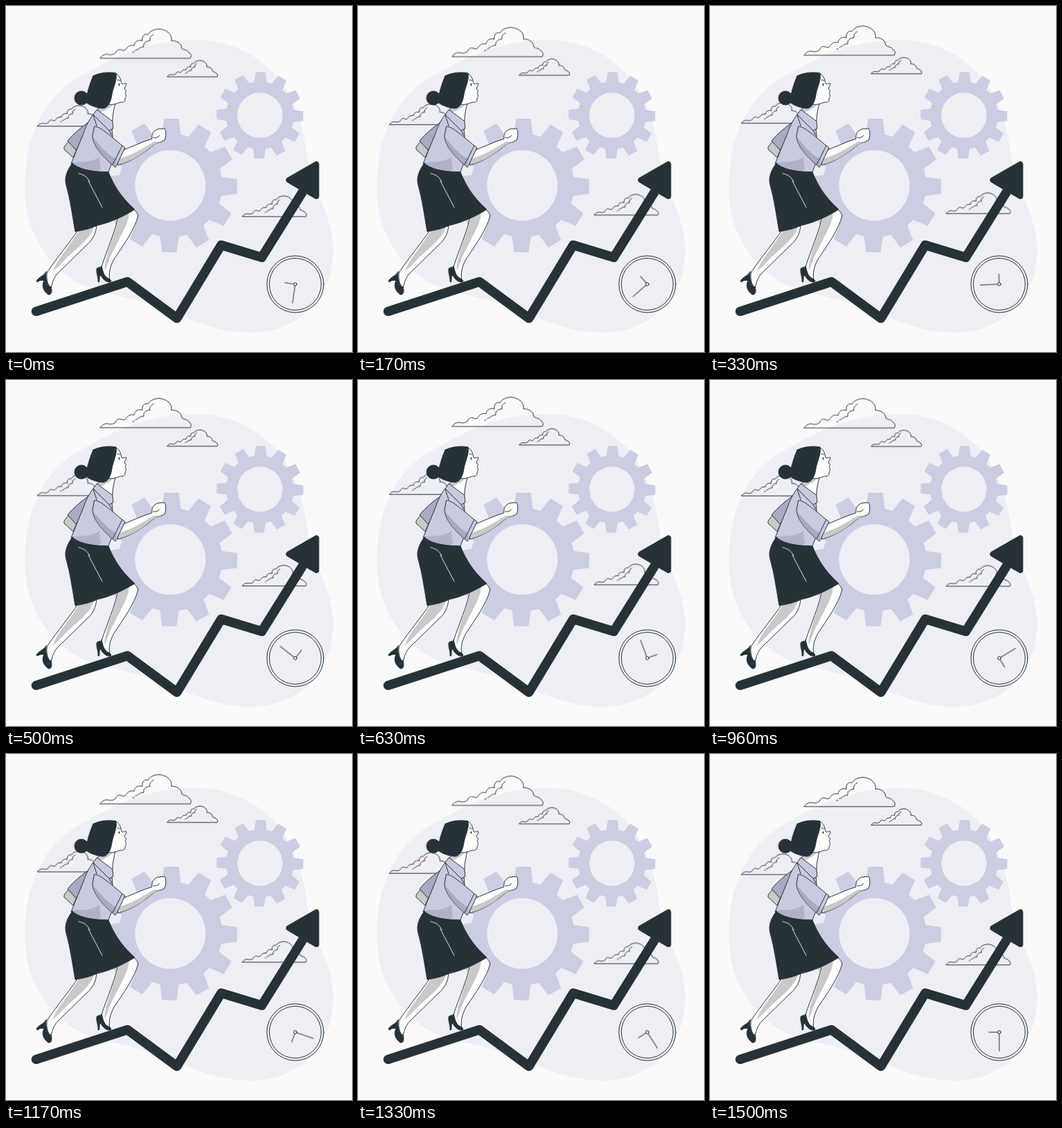
An HTML page for the animation above (1.54 s loop, 500 px wide and 500 px high).

```html
<!DOCTYPE html>
<html lang="en">
<head>
<meta charset="utf-8">
<title>Growth</title>
<style>
  html, body { margin: 0; width: 100%; height: 100%; overflow: hidden; background: #fafafa; }
  svg { display: block; width: 100vw; height: 100vh; }
  .ink { fill: #263238; }
  .soft { fill: #cbcde2; }
  .blob { fill: #eeeff5; }
  .line { fill: none; }
  .white { fill: #fff; }
  .shade { fill: #c9c9c9; stroke: none; }
  .shirt { fill: #c8cae0; }
  .fold { fill: #a8aac2; }
  .thin { stroke: #263238; stroke-width: 1; stroke-linecap: round; stroke-linejoin: round; }
  .cloud path { vector-effect: non-scaling-stroke; }
  .float { animation: float 1540ms linear infinite; }
  .hands { transform-origin: 418px 402px; animation: turn 1540ms linear infinite; }
  @keyframes float {
    0% { transform: translateY(-.45px); }
    46.5% { transform: translateY(-10px); }
    95.2%, 100% { transform: translateY(0); }
  }
  @keyframes turn {
    0% { transform: rotate(8deg); }
    95.2%, 100% { transform: rotate(360deg); }
  }
</style>
</head>
<body>
<svg viewBox="0 0 500 500">
  <defs>
    <g id="cloud" class="cloud thin line">
      <path d="M0 0C3-4 7-6 11-5.500C15-4 19-5 22-7C24-12 27-13 30-12C34-10 37-11 38-14C41-18 45-19 49-18C50-24 55-27 61-25C60-32 65-36 69-34C72-39 78-42 86-42C96-41 105-34 103-25C110-26 118-21 118-14C122-11 127-12 128-8C132-7 132-2 130.500 0Z"/>
      <path d="M77-34C73-32 71-29 72-25C66-25 62-21 63-16C58-17 55-12 51-11M49-9L47-8.500"/>
    </g>
  </defs>

  <path class="blob" d="M275 49C326 49 371 74 397 109C425 146 430 186 437 225C441 264 473 303 473 352C472 425 420 472 355 472C297 472 259 448 207 430C163 416 119 416 82 385C44 352 27 309 27 262C27 194 51 136 100 106C150 77 198 49 275 49Z"/>
  <path id="bigGear" class="soft" fill-rule="evenodd"/>
  <path id="smallGear" class="soft" fill-rule="evenodd"/>

  <g class="float">
    <use href="#cloud" transform="translate(136 75.700)"/>
    <use href="#cloud" transform="translate(233 102.500) scale(.555)"/>
    <use href="#cloud" transform="translate(45.500 173.900) scale(.705)"/>
    <use href="#cloud" transform="translate(341.500 304.500) scale(.705)"/>
  </g>

  <g class="thin line">
    <circle cx="418" cy="402" r="41"/>
    <circle cx="418" cy="402" r="37.500"/>
    <path class="hands" d="M418 404.500V429.500M415.500 402H403"/>
    <circle cx="418" cy="402" r="2.300"/>
  </g>

  <g stroke="#263238" stroke-linejoin="round" stroke-linecap="round">
    <path class="line" stroke-width="13.500" d="M43.500 441.300L175.500 398.500L247 451.300L311 345.500L369.500 363.300L434 260"/>
    <path class="ink" stroke-width="8" d="M408.500 251.500L448.500 228.500V275Z"/>
  </g>

  <g class="thin">
    <!-- legs -->
    <path class="white" d="M104 324C92 342 75 362 60 384C57 390 60 404 65 408C67 399 69 392 75 386L116 346C126 337 130 329 131 316Z"/>
    <path class="shade" d="M105 325L127 319C122 337 102 350 85 367L68 384C70 371 88 353 105 325Z"/>
    <path class="white" d="M162 304C158 326 146 352 138 377C140 387 144 393 150 396C148 387 150 377 156 366C170 345 186 323 191 303C190 299 187 296 183 292Z"/>
    <path class="shade" d="M162 305L178 298C178 317 156 347 148 370L143 383C140 366 158 333 162 305Z"/>
    <!-- shoes -->
    <path class="ink" d="M58 384C54 391 48 391 44 397L45 399C49 396 53 396 55 397C51 404 54 412 61 417C66 418 67 412 65 406C59 404 57 394 58 384Z"/>
    <path class="ink" d="M138 376C136 379 132 377 131 380C130 386 134 392 133 399L135 398C135 393 135 389 137 389C139 394 145 400 151 399C154 396 148 394 145 392C140 388 140 381 138 376Z"/>
    <!-- far arm -->
    <path class="shade thin" d="M91 195C87 200 83 203 84 207L97 219L105 201Z"/>
    <path class="fold" d="M119 168C108 176 97 185 89 195L101 208L117 194Z"/>
    <!-- neck and face -->
    <path class="white" d="M134 143C134 150 131 155 128 158L149 177L154 166C154 157 156 149 158 140Z"/>
    <path class="shade" d="M134 146L157 141C150 148 141 152 134 155Z"/>
    <path class="white" d="M158 97C163 99 166 105 167 112C169 114 172 111 174 112C174 115 171 118 171 120C174 121 174 124 172 126C174 129 174 131 172 133C173 138 169 140 165 139C159 142 153 143 147 142Z"/>
    <path class="line" d="M161 107Q163 106 165 108"/>
    <ellipse class="ink" stroke="none" cx="163.500" cy="113.500" rx="1" ry="1.800"/>
    <!-- hair -->
    <circle class="ink" cx="109" cy="133" r="10"/>
    <path class="ink" d="M126 101C136 96 149 95 159 97C161 107 155 117 153 128C152 138 147 148 140 148C130 147 122 144 115 139C117 126 121 112 126 101Z"/>
    <!-- shirt -->
    <path class="shirt" d="M126 157C119 166 115 175 112 184L94 228C101 236 128 240 148 240L157 217L153 178Z"/>
    <path class="fold" stroke="none" d="M95 227C106 223 119 229 135 218L137 238C121 238 103 234 95 227Z" opacity=".75"/>
    <path class="shirt" d="M131 150L126 157L149 180L155 177L154 167Z"/>
    <path class="line" d="M126 157L131 173M149 180L153 187"/>
    <!-- near arm -->
    <path class="white" d="M163 211C180 204 195 197 211 192C210 184 214 180 219 178L229 177C232 181 231 190 229 194C225 197 217 197 213 201C199 213 183 224 162 230Z"/>
    <path class="shade" d="M163 221C182 216 200 204 214 196L224 196C217 198 213 201 209 204C195 216 180 225 162 229Z"/>
    <path class="line" d="M213 190Q218 192 222 187"/>
    <path class="shirt" d="M128 174C137 174 152 189 172 205C168 213 163 224 158 233C143 221 126 204 125 188Z"/>
    <path class="fold" stroke="none" d="M126 190C135 202 148 215 160 222L157 231C143 220 128 206 126 190Z"/>
    <path class="line" d="M168 202C163 211 159 221 154 229"/>
    <!-- skirt -->
    <path class="ink" d="M96 227C88 238 84 248 87 259C93 280 96 303 100 326C112 324 121 322 132 317C151 313 170 304 186 294C172 281 159 267 148 240C126 240 104 236 96 227Z"/>
    <path class="line" style="stroke:#dedee5" d="M105 242C114 244 118 248 121 254M119 253L139 291"/>
  </g>
</svg>
<script>
  // Twelve-toothed wheel with a round hole.
  function gear(id, cx, cy, tip, root, hole, tipHalf, rootHalf) {
    const at = (r, deg) => {
      const a = deg * Math.PI / 180;
      return (cx + r * Math.sin(a)).toFixed(2) + ' ' + (cy - r * Math.cos(a)).toFixed(2);
    };
    let d = '';
    for (let k = 0; k < 12; k++) {
      const a = 1 + k * 30;
      d += (k ? `A${root} ${root} 0 0 1 ` : 'M') + at(root, a - rootHalf) +
        'L' + at(tip, a - tipHalf) + 'L' + at(tip, a + tipHalf) + 'L' + at(root, a + rootHalf);
    }
    d += `A${root} ${root} 0 0 1 ${at(root, 1 - rootHalf)}Z` +
      `M${cx - hole} ${cy}a${hole} ${hole} 0 1 0 ${2 * hole} 0a${hole} ${hole} 0 1 0 ${-2 * hole} 0Z`;
    document.getElementById(id).setAttribute('d', d);
  }
  gear('bigGear', 237.5, 259.3, 97, 75, 51, 6.3, 10.5);
  gear('smallGear', 367, 158, 63, 49, 32.8, 6.3, 10.5);
</script>
</body>
</html>
```
